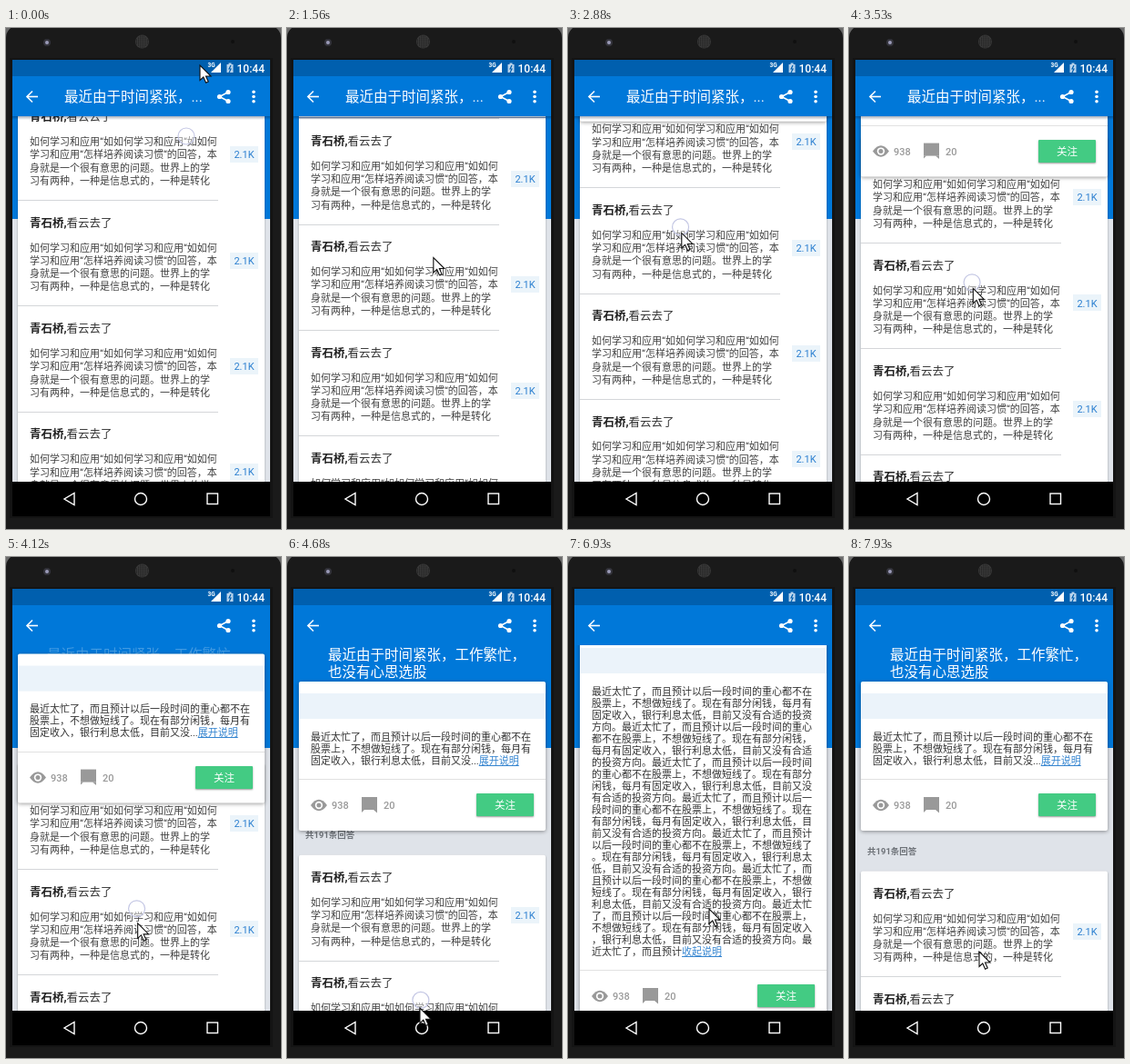
Recreate the animation shown at these times as an HTML page with a canvas. Size 302 by 551 pixels, loop 8 s.

```html
<!DOCTYPE html>
<html lang="zh-CN">
<head>
<meta charset="utf-8">
<style>
html, body { margin: 0; height: 100%; overflow: hidden; background: #1a1a1a; }
canvas { display: block; }
</style>
</head>
<body>
<canvas id="stage" width="302" height="551"></canvas>
<script>
const ctx = document.getElementById('stage').getContext('2d');
const LOOP = 8000, PITCH = 116.4, BLUE = '#0078d9';
const FONT = 'Roboto, "Noto Sans CJK SC", "Noto Sans CJK", sans-serif';
const TOUCH_LAG = 70, START_SCROLL = -505.2;
const EXPAND_AT = 6140, COLLAPSE_AT = 7590, RESIZE_TIME = 340;

// Pointer moves; a drag carries the list along with the touch.
const start = { x: 198, y: 119 };
const move = (from, to, x, y) => ({ from, to, x, y });
const drag = (from, to, x, y) => ({ from, to, x, y, pressed: true });
const moves = [
  drag(-10, 0, 213, 41),
  drag(520, 650, 208, 4),
  drag(650, 1200, 155, 262),
  move(1490, 1560, 161, 253),
  move(1560, 1800, 119, 143),
  drag(1930, 2450, 123, 216),
  drag(2780, 3570, 137, 290),
  drag(3630, 4400, 149, 467),
  drag(4450, 4830, 144, 515),
  move(5180, 5590, 228, 229),
  move(6400, 6930, 155, 387),
  move(6990, 7410, 143, 434)
];

const summary = '最近太忙了，而且预计以后一段时间的重心都不在股票上，不想做短线了。现在有部分闲钱，每月有固定收入，银行利息太低，目前又没';
const fullText = (summary + '有合适的投资方向。').repeat(8);
const answer = [
  '如何学习和应用“如如何学习和应用“如如何',
  '学习和应用“怎样培养阅读习惯“的回答，本',
  '身就是一个很有意思的问题。世界上的学',
  '习有两种，一种是信息式的，一种是转化'
];
const arrow = new Path2D('M0 0V16.5L3.8 13 6.6 19.3 9.2 18.1 6.5 12H12z');

const clamp = (v, lo, hi) => Math.min(hi, Math.max(lo, v));
const ease = v => (v = clamp(v, 0, 1), v * v * (3 - 2 * v));

function pointerAt(t) {
  let { x, y } = start, scroll = START_SCROLL, pressed = true;
  for (const m of moves) {
    if (t < m.from) break;
    const p = clamp((t - m.from) / (m.to - m.from), 0, 1);
    const dy = (m.y - y) * p;
    x += (m.x - x) * p;
    y += dy;
    if (m.pressed) scroll += dy;
    pressed = !!m.pressed;
  }
  return { x, y, scroll: Math.min(0, scroll), pressed };
}
const tapping = (t, release) => t >= release - 180 && t < release + 40;

function rect(x, y, w, h, color) {
  ctx.fillStyle = color;
  ctx.fillRect(x, y, w, h);
}
function text(str, x, midY, size, color, weight = 400, align = 'left') {
  ctx.font = `${weight} ${size}px ${FONT}`;
  ctx.textAlign = align;
  ctx.fillStyle = color;
  ctx.fillText(str, x, Math.round(midY + size * .37));
  return ctx.measureText(str).width;
}
function dot(x, y, r, color) {
  ctx.fillStyle = color;
  ctx.beginPath();
  ctx.arc(x, y, r, 0, 7);
  ctx.fill();
}
function shape(color, ...points) {
  ctx.fillStyle = color;
  ctx.beginPath();
  points.forEach(([x, y]) => ctx.lineTo(x, y));
  ctx.fill();
}
function stroke(color, width, ...points) {
  ctx.strokeStyle = color;
  ctx.lineWidth = width;
  ctx.beginPath();
  points.forEach(([x, y]) => ctx.lineTo(x, y));
  ctx.stroke();
}
function panel(x, y, w, h, color, blur = 2, radius = 2) {
  ctx.save();
  ctx.shadowColor = 'rgba(0,0,0,.4)';
  ctx.shadowBlur = blur;
  ctx.shadowOffsetY = 1;
  ctx.fillStyle = color;
  ctx.beginPath();
  ctx.roundRect(x, y, w, h, radius);
  ctx.fill();
  ctx.restore();
}
function clipTo(x, y, w, h, draw) {
  ctx.save();
  ctx.beginPath();
  ctx.rect(x, y, w, h);
  ctx.clip();
  draw();
  ctx.restore();
}

function drawPhone() {
  rect(0, 0, 302, 551, '#6a6a6a');
  ctx.fillStyle = '#1a1a1a';
  ctx.beginPath();
  ctx.roundRect(0, -3, 302, 600, 14);
  ctx.fill();
  rect(4, 33, 289, 506, '#141414');
  dot(45, 16, 4, '#34343c');
  dot(45, 16, 2, '#9a9ab8');
  dot(149.5, 15, 7.5, '#3a3a3a');
  for (let y = -6; y <= 6; y += 2)
    for (let x = -6; x <= 6; x += 2)
      if (x * x + y * y < 46) dot(149.5 + x, 15 + y, .6, '#161616');
  dot(249, 15, 2, '#101010');
}

function drawList(offset, markEdge) {
  const top = 345.5 + offset;
  text('共191条回答', 20, top - 22.5, 9.5, '#6d7278', 700);
  panel(13, top, 271, 4000, '#fff');
  for (let i = 0; i < 9; i++) {
    const y = top + i * PITCH;
    if (y > 500 || y < -PITCH) continue;
    const nameWidth = text('青石桥,', 26, y + 24.5, 12.5, '#222', 700);
    text('看云去了', 26 + nameWidth, y + 24.5, 12.5, '#333');
    answer.forEach((line, n) => text(line, 26, y + 52 + n * 14.3, 11, '#404040'));
    rect(246, Math.round(y + 57), 31, 18, '#ebf4fa');
    text('2.1K', 261.5, y + 66, 11, '#2b7fd0', 400, 'center');
    rect(13, Math.round(y + PITCH - .5), 220, 1, '#d4d6d9');
  }
  if (markEdge) rect(13, Math.round(top + PITCH - 1.4), 271, 1, '#7891b5');
}

function drawDescription(top, open) {
  const count = open ? 23 : 3;
  for (let i = 0; i < count; i++) {
    const y = top + i * 13, last = i === count - 1;
    let line = (open ? fullText : summary).slice(i * 22, i * 22 + 22);
    if (last) line = open ? line.slice(0, 9) : line + '...';
    const w = text(line, 26, y, 11, '#333');
    if (!last) continue;
    text(open ? '收起说明' : '展开说明', 26 + w, y, 11, '#3585d0');
    rect(26 + w, Math.round(y + 5), 44, 1, '#3585d0');
  }
}

function drawCard(top, bottom, open) {
  const footer = Math.round(bottom - 57), mid = bottom - 28;
  panel(13, top, 271, bottom - top, '#fff', 4);
  rect(13, top + 13, 271, 28, '#ebf3fa');
  clipTo(13, top + 41, 271, footer - top - 41, () => drawDescription(top + 60.5, open));
  rect(13, footer, 271, 1, '#e1e1e1');
  // views
  ctx.fillStyle = '#999';
  ctx.beginPath();
  ctx.moveTo(26, mid);
  ctx.quadraticCurveTo(35, mid - 12.5, 44, mid);
  ctx.quadraticCurveTo(35, mid + 12.5, 26, mid);
  ctx.fill();
  dot(35, mid, 4.2, '#fff');
  dot(35, mid, 2.5, '#999');
  text('938', 49, mid, 11, '#999', 500);
  // comments
  rect(82, mid - 9, 17, 14, '#999');
  shape('#999', [82, mid + 5], [82, mid + 8], [85, mid + 5]);
  shape('#999', [95, mid + 5], [99, mid + 5], [99, mid + 8.5]);
  text('20', 106, mid, 11, '#999', 500);
  panel(208, Math.round(bottom - 41), 63, 25, '#43cb83', 2, 1);
  text('关注', 239.5, mid, 11.5, '#fff', 500, 'center');
}

function drawBars(collapsed) {
  rect(7, 35, 283, 18, '#005fae');
  rect(7, 53, 283, 44, BLUE);
  ctx.globalAlpha = collapsed;
  const shade = ctx.createLinearGradient(0, 97, 0, 101);
  shade.addColorStop(0, 'rgba(0,25,60,.35)');
  shade.addColorStop(1, 'rgba(0,25,60,0)');
  rect(7, 97, 283, 4, shade);
  text('最近由于时间紧张，...', 64, 75, 15.5, '#fff');
  ctx.globalAlpha = 1;
  // status icons
  text('3G', 221.5, 41, 6.5, '#fff', 700);
  shape('#fff', [225, 49], [236, 49], [236, 38]);
  rect(242.5, 40, 7, 9, '#b9d4ec');
  rect(244.5, 38.5, 3, 2, '#b9d4ec');
  stroke('#005fae', 1.2, [247, 41], [245, 45], [247, 45], [245, 49]);
  text('10:44', 284, 44.5, 12, '#fff', 500, 'right');
  // toolbar icons
  const mid = 75.5, share = [[244, mid - 5], [234.5, mid], [244, mid + 5]];
  stroke('#fff', 1.6, [35, mid], [23.5, mid]);
  stroke('#fff', 1.6, [29, mid - 6], [23, mid], [29, mid + 6]);
  stroke('#fff', 1.5, ...share);
  share.forEach(([x, y]) => dot(x, y, 2.6, '#fff'));
  for (let i = -1; i <= 1; i++) dot(272, mid + i * 5.2, 1.8, '#fff');
}

function drawNav() {
  rect(7, 499, 283, 38, '#000');
  stroke('#fff', 1.4, [75, 511.5], [75, 524.5], [64, 518], [75, 511.5], [75, 524.5]);
  ctx.beginPath();
  ctx.arc(148, 518, 6.5, 0, 7);
  ctx.stroke();
  ctx.strokeRect(221, 512, 11.5, 11.5);
}

function drawPointer(cursor, touch, touching) {
  if (touching) {
    dot(touch.x, touch.y, 9, 'rgba(255,255,255,.4)');
    ctx.strokeStyle = '#c4c7e4';
    ctx.lineWidth = 1.2;
    ctx.stroke();
  }
  ctx.save();
  ctx.translate(cursor.x, cursor.y);
  ctx.fillStyle = '#fff';
  ctx.fill(arrow);
  ctx.strokeStyle = '#111';
  ctx.lineWidth = 1.1;
  ctx.stroke(arrow);
  ctx.restore();
}

function draw(t) {
  const cursor = pointerAt(t), touch = pointerAt(t - TOUCH_LAG);
  const touching = (touch.pressed && t < 5000) || tapping(t, EXPAND_AT) || tapping(t, COLLAPSE_AT);
  const lift = clamp(touch.scroll + 88, -206, 0);
  const expand = ease((t - EXPAND_AT) / RESIZE_TIME) - ease((t - COLLAPSE_AT) / RESIZE_TIME);
  drawPhone();
  clipTo(7, 35, 283, 464, () => {
    rect(7, 35, 283, 464, '#dfe3e9');
    rect(7, 53, 283, 157, BLUE);
    ctx.globalAlpha = clamp(1 + lift / 41, 0, 1);
    text('最近由于时间紧张，工作繁忙，', 45, 107.5, 15.5, '#fff');
    text('也没有心思选股', 45, 126.5, 15.5, '#fff');
    ctx.globalAlpha = 1;
    drawList(touch.scroll + 210 * expand, t > 1270 && t < 2800);
    if (lift > -206) drawCard(137 + lift - 50 * expand, 301 + lift + 210 * expand, expand > 0);
    drawBars(clamp((-lift - 41) / 20, 0, 1));
  });
  drawNav();
  drawPointer(cursor, touch, touching);
}

function loop(now) {
  draw(now % LOOP);
  requestAnimationFrame(loop);
}
requestAnimationFrame(loop);
</script>
</body>
</html>
```
